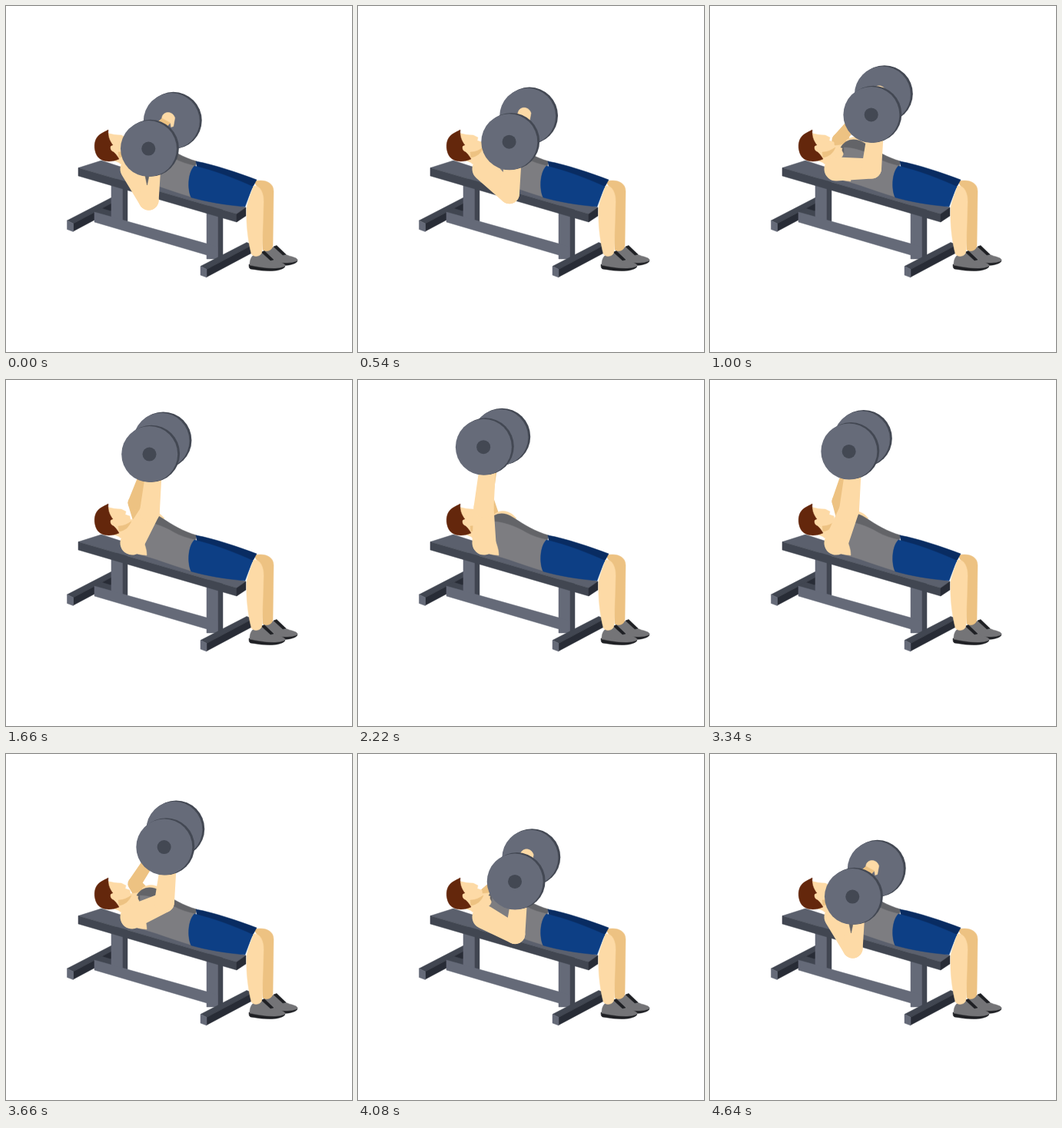
Recreate the animation shown at these times as an HTML page with a canvas. Size 450x450 px, loop 4660 ms.

```html
<!DOCTYPE html>
<html lang="en">
<head>
<meta charset="utf-8">
<title>Bench press</title>
<style>
html, body { margin: 0; width: 100%; height: 100%; overflow: hidden; background: #fff; }
canvas { display: block; width: 100vw; height: 100vh; }
</style>
</head>
<body>
<canvas id="stage" width="450" height="450"></canvas>
<script>
const ctx = document.getElementById('stage').getContext('2d');
const LOOP = 4660, STEPS = 100, RISE = 50, FALL = 39;
const SKIN = '#fddaa6', SKIN_FAR = '#edc282', SHIRT = '#7d7d81', SHIRT_FAR = '#636468';
const STEEL = '#656a78', STEEL_TOP = '#5b606d', STEEL_SHADE = '#414651', STEEL_DARK = '#282c36';
const PLATE = '#666b79', RIM = '#434853', SOLE = '#1f2024';
const SHOULDER = { x: 164, y: 212 }, FAR_SHOULDER = { x: 174, y: 178 };
const UPPER_ARM = 46;

const ease = u => (1 - Math.cos(Math.PI * Math.min(1, u))) / 2;
const shift = (p, dx, dy) => ({ x: p.x + dx, y: p.y + dy });

// Uneven playback cadence: steps last 20, 100 and 20 ms in turn.
function stepAt(ms) {
  const r = ms % 140;
  return 3 * Math.floor(ms / 140) + (r < 20 ? 0 : r < 120 ? 1 : 2);
}

// The upper arm swings about the shoulder while the forearm stays upright.
function poseAt(step) {
  const lift = ease(Math.min(step / RISE, (STEPS - step) / FALL));
  const angle = (62 - 154 * lift) * Math.PI / 180;
  const elbow = shift(SHOULDER, UPPER_ARM * Math.cos(angle), UPPER_ARM * Math.sin(angle));
  const near = shift(elbow, 0.3, -67 - 12 * lift ** 1.5);
  const far = shift(near, 13 + 50 * (lift - 0.58) ** 2, 23.5 * lift - 36);
  const farElbow = { x: 167, y: 190 - 38 * lift };
  return { lift, elbow, near, far, farElbow };
}

function shape(color, d) {
  const path = new Path2D(d);
  ctx.fillStyle = ctx.strokeStyle = color;
  ctx.lineWidth = 0.5;
  ctx.fill(path);
  ctx.stroke(path);
}

function disc(color, x, y, r) {
  ctx.fillStyle = color;
  ctx.beginPath();
  ctx.arc(x, y, r, 0, 2 * Math.PI);
  ctx.fill();
}

function limb(color, a, ra, b, rb) {
  const dir = Math.atan2(b.y - a.y, b.x - a.x);
  const lean = Math.acos((ra - rb) / Math.hypot(b.x - a.x, b.y - a.y));
  ctx.fillStyle = color;
  ctx.beginPath();
  ctx.arc(a.x, a.y, ra, dir + lean, dir - lean + 2 * Math.PI);
  ctx.arc(b.x, b.y, rb, dir - lean, dir + lean);
  ctx.fill();
}

function plate({ x, y }) {
  disc(RIM, x + 2, y - 0.8, 37);
  disc(PLATE, x - 0.4, y, 36.5);
}

function foot(x, y) {
  ctx.save();
  ctx.translate(x, y);
  shape(STEEL_SHADE, 'M0 0L60 -31L68 -28L8 4Z');
  shape(STEEL_DARK, 'M8 4L68 -28V-18L8 14Z');
  shape(STEEL, 'M0 0L8 4V14.5L0 11.5Z');
  ctx.restore();
}

function post(x, top, bottom) {
  ctx.save();
  ctx.translate(x, 0);
  shape(STEEL, `M0 ${top}H15V${bottom}H0Z`);
  shape(STEEL_SHADE, `M15 ${top}H21V${bottom}H15Z`);
  ctx.restore();
}

function bench() {
  foot(79.5, 279);
  shape(STEEL_SHADE, 'M115 268L124 263L140 268V276Z');
  post(137, 225, 280);
  post(261, 260, 329);
  shape(STEEL, 'M115 268L275 313V328L115 281Z');
  foot(253, 338.5);
  shape(STEEL_TOP, 'M94 210.5L124 201L312 262L300 270.5Z');
  shape(STEEL_SHADE, 'M94 210.5L300 270.5V281L94 221Z');
  shape(STEEL_DARK, 'M300 270.5L312 262V273L300 281Z');
}

function shoe(x, y) {
  ctx.save();
  ctx.translate(x, y);
  shape(SOLE, 'M0 13C0 16 0 18 2 19L16 21C28 22 42 22 47 16L45 12Z');
  shape('#747477', 'M1 14C1 7 3 3 6 1L20 -4C26 4 31 8 40 10C46 12 48 14 47 15C40 20 18 18 1 14Z');
  shape(SOLE, 'M16 -3L20 -4.5L32 7L28 8Z');
  ctx.restore();
}

function legs() {
  shoe(332, 316);
  shape(SKIN_FAR, 'M322 228C336 225 348 229 348 241L347 312C346 319 337 320 334 317L330 240Z');
  shoe(316, 323);
  shape('#092c62', 'M247 202C270 206 302 217 326 226L320 237L250 218Z');
  shape('#0d3f85', 'M245 208C270 214 300 225 321 235C317 244 314 253 311 261C286 259 258 254 241 249C236 240 236 217 245 208Z');
  shape(SKIN, 'M313 262C315 252 319 243 322 234C330 233 335 242 335 254L333 319C332 327 321 327 319 322C315 306 312 284 313 262Z');
}

function torso() {
  shape(SKIN, 'M143 182C153 184 164 181 177 180L172 211L148 205Z');
  shape(SKIN, 'M177 175C186 167 198 170 206 180L190 186Z');
  shape(SHIRT_FAR, 'M170 184C177 172 190 171 202 179C216 188 230 197 248 202L244 217L180 204Z');
  shape(SHIRT, 'M162 202C172 200 176 193 174 184C187 184 205 190 218 198C227 203 237 206 246 208C239 220 236 235 240 248C219 242 192 231 170 226Z');
}

function head() {
  shape(SKIN, 'M131 165C137 167 144 168 150 168L156 171L155 175L161 177L162 183L172 185L166 202L148 204L132 198Z');
  shape(SKIN_FAR, 'M146 190C153 190 158 187 163 184C160 192 154 196 147 197Z');
  shape('#64270c', 'M133 161C130 163 124 165 120 169C114 175 114 186 118 194C123 203 136 204 147 199C144 194 141 190 138 189C134 186 136 181 139 181C136 177 132 171 133 161Z');
  shape(SKIN, 'M136 183C139 180 144 183 145 187C143 191 137 189 136 183Z');
}

function farArm({ far, farElbow }) {
  limb(SKIN_FAR, FAR_SHOULDER, 10, farElbow, 8.5);
  limb(SKIN_FAR, farElbow, 8.5, shift(far, -4, -4), 6);
  ctx.save();
  ctx.translate(far.x, far.y);
  shape(SKIN, 'M-13 -4C-12 -13 1 -14 4 -4L2 7L-1 8L-2 2Z');
  ctx.restore();
}

function nearArm({ lift, elbow, near }) {
  if (lift > 0.15) shape(SKIN, 'M150 211C153 222 165 226 183 228C183 220 180 212 176 203Z');
  limb(SKIN, SHOULDER, 15.5, elbow, 13);
  limb(SKIN, elbow, 13, shift(near, 6, 14), 10);
  if (lift < 0.03) shape(SHIRT_FAR, 'M181 221H186L183.5 233Z');
}

function draw(pose) {
  ctx.fillStyle = '#fff';
  ctx.fillRect(0, 0, 450, 450);
  bench();
  plate(pose.far);
  farArm(pose);
  torso();
  legs();
  head();
  nearArm(pose);
  plate(pose.near);
  disc(RIM, pose.near.x - 0.6, pose.near.y, 9);
}

function tick() {
  draw(poseAt(stepAt(performance.now() % LOOP)));
  requestAnimationFrame(tick);
}
tick();
</script>
</body>
</html>
```
